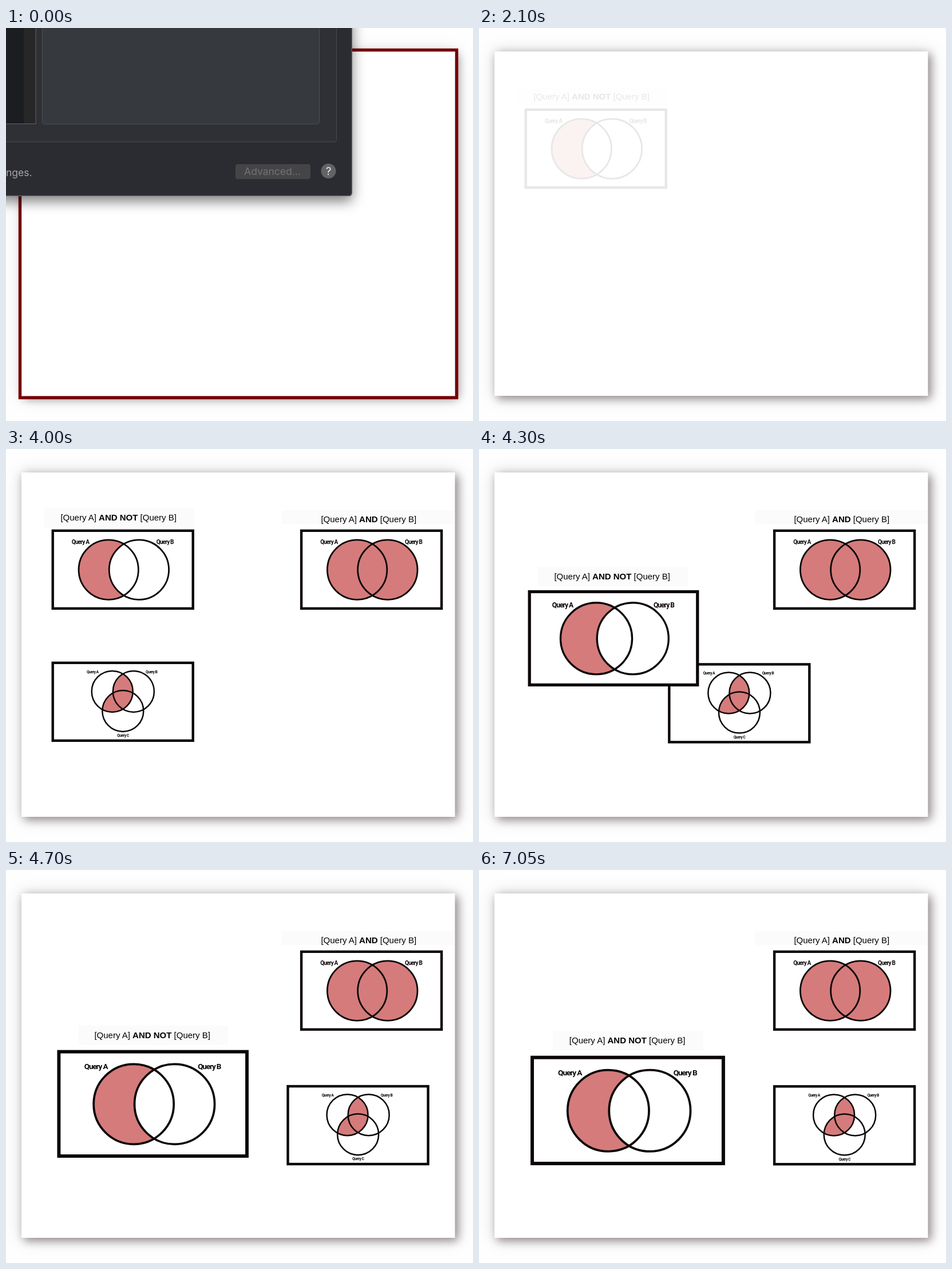
Recreate the animation shown at these times as an HTML page. Size 816 by 687 pixels, loop 7.95 s.

```html
<!DOCTYPE html>
<html lang="en">
<head>
<meta charset="utf-8">
<title>Query diagrams</title>
<style>
  html, body { margin: 0; width: 100%; height: 100%; overflow: hidden; background: #fefefe; }
  svg { display: block; }
  .caption { font: 15px "Liberation Sans", Arial, sans-serif; white-space: pre; }
  .caption tspan { font-weight: 700; }
  .label { font-family: Roboto, sans-serif; font-weight: 700; letter-spacing: -.08em; fill: #0b0607; }
  .ui { font-family: Inter, sans-serif; }
  .soft { filter: drop-shadow(0 0 13px rgba(0, 0, 0, .16)); }
  .page { filter: drop-shadow(5px 5px 8px rgba(65, 48, 53, .5)); }
  .window { filter: drop-shadow(0 9px 11px rgba(0, 0, 0, .5)); }
</style>
</head>
<body>
<svg id="stage" width="816" height="687" viewBox="0 0 816 687"></svg>
<script>
const LOOP = 7950, STEP = 50;
const RED = '#d57b7b', INK = '#0b0607';
const stage = document.getElementById('stage');

const circle = (x, y, r, attrs) => `<circle cx="${x}" cy="${y}" r="${r}" ${attrs}/>`;
const ring = (x, y, r, width) =>
  circle(x, y, r, `fill="none" stroke="${INK}" stroke-width="${width}"`);
const label = (x, y, size, letter) =>
  `<text class="label" x="${x}" y="${y}" font-size="${size}">Query ${letter}</text>`;
const caption = (x, y, operator, right) =>
  `<text class="caption" x="${x}" y="${y}">[Query A] <tspan>${operator}</tspan> [Query B]</text>`;
const panel = `<rect x="2.2" y="2.2" width="245" height="136" fill="#fff" stroke="${INK}" stroke-width="4.4"/>`;

// Diagrams are drawn from their own top left corner.
function pair(fillB) {
  const a = [99.7, 70.5, 52.2], b = [152.9, 70.5, 52.2];
  return panel + circle(...a, `fill="${RED}"`) + circle(...b, `fill="${fillB}"`) +
    ring(...a, 2.8) + ring(...b, 2.8) +
    label(35.3, 25, 10, 'A') + label(183.2, 25, 10, 'B');
}

function triple() {
  const a = [106.2, 52.3, 36], b = [143.3, 52.3, 36], c = [124.8, 86.4, 36];
  return panel + `<clipPath id="inA">${circle(...a, '')}</clipPath>` +
    `<g clip-path="url(#inA)" fill="${RED}">${circle(...b, '') + circle(...c, '')}</g>` +
    [a, b, c].map(p => ring(...p, 2.5)).join('') +
    label(61.4, 20.3, 6.8, 'A') + label(164.5, 20.3, 6.8, 'B') + label(114.6, 131.6, 6.8, 'C');
}

const settings = `
  <path class="window" d="M-300-300H605V288a6 6 0 0 1-6 6H-300z" fill="#2b2c31"/>
  <path d="M-300-300H604.3V288a5.5 5.5 0 0 1-5.5 5.4H-300z" fill="none" stroke="#68696c" stroke-width="1.2"/>
  <rect x="-50" y="-50" width="627.5" height="249" rx="4" fill="#2f3035" stroke="#494a4e"/>
  <rect x="-50" y="-50" width="102" height="217.5" fill="#272727" stroke="#626365"/>
  <rect x="-50" y="-50" width="81" height="217" fill="#1c1d21"/>
  <rect x="63.5" y="-50" width="484" height="218" rx="4" fill="#36393d" stroke="#4d4f53"/>
  <rect x="401" y="238" width="131" height="26" rx="4" fill="#454547"/>
  <circle cx="563.5" cy="250" r="13" fill="#636365"/>
  <g class="ui" font-size="17.5">
    <text x="0" y="258.5" fill="#a6a6a8">nges.</text>
    <text x="465.5" y="257" fill="#737376" text-anchor="middle">Advanced...</text>
    <text x="563.5" y="257" fill="#f2f2f2" font-size="19" text-anchor="middle">?</text>
  </g>`;

stage.innerHTML = `
  <rect width="816" height="687" fill="#fefefe"/>
  <g class="soft"><rect class="page" x="27" y="41" width="757.5" height="602" fill="#fff"/></g>
  <rect id="border" x="24.5" y="38.5" width="763" height="607.8" fill="none" stroke="#770003" stroke-width="5.4"/>
  <g id="both">
    <rect x="482" y="107" width="302" height="24.5" fill="#fbfbfb"/>
    ${caption(550.4, 128, 'AND')}
    <g transform="translate(513.9 140.6)">${pair(RED)}</g>
  </g>
  <g id="three">${triple()}</g>
  <g id="only">
    <g id="onlyCaption">
      <rect x="67" y="103" width="262" height="34" fill="#fbfbfb"/>
      ${caption(95.4, 124.5, 'AND NOT')}
    </g>
    <g id="onlyDiagram">${pair('#fff')}</g>
  </g>
  <g id="settings">${settings}</g>`;

const part = id => document.getElementById(id);
const parts = Object.fromEntries(
  ['border', 'both', 'three', 'only', 'onlyCaption', 'onlyDiagram', 'settings'].map(id => [id, part(id)]));

const progress = (t, start, length) => Math.min(1, Math.max(0, (t - start) / length));
const easeOut = u => 1 - (1 - u) ** 3;
const mix = (a, b, u) => a + (b - a) * u;
const fade = (name, value) => parts[name].setAttribute('opacity', value);
const move = (name, x, y, scale = 1) =>
  parts[name].setAttribute('transform', `translate(${x} ${y}) scale(${scale})`);

function render(t) {
  fade('settings', 1 - progress(t, 0, 350));
  fade('border', 1 - progress(t, 800, 500));
  fade('only', t < 2100 ? 0 : progress(t, 2022, 870));
  const second = progress(t, 2893, 870);
  fade('both', second);
  fade('three', second);

  const p = easeOut(progress(t, 4032, 1075));
  move('three', mix(79.5, 513.9, p), mix(371.6, 376.1, p));
  move('onlyCaption', 62.4 * p, 178.7 * p);
  move('onlyDiagram', mix(79.5, 90, p), mix(140.6, 324.7, p), mix(1, 1.363, p ** 1.1));
}

const began = performance.now();
function tick() {
  const t = (performance.now() - began) % LOOP;
  render(Math.floor(t / STEP) * STEP);
  requestAnimationFrame(tick);
}
render(0);
requestAnimationFrame(tick);
</script>
</body>
</html>
```
